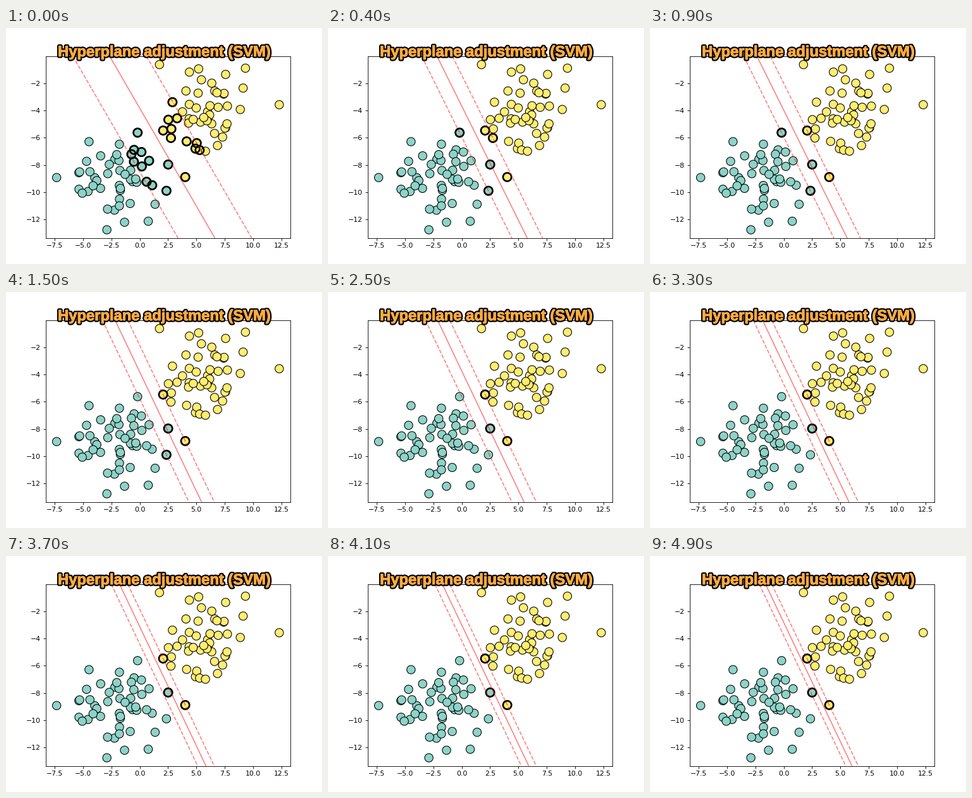
A matplotlib script that plays this animation: 500 px wide and 375 px high, repeating every 5000 ms.

```python
import matplotlib.patheffects as pe
import matplotlib.pyplot as plt
import numpy as np
from matplotlib.animation import FuncAnimation

SEED, COUNT, SPREAD = 40, 100, 1.9
PENALTIES = 0.01 + 0.05 * np.arange(50)
DOT_AREA = 150


def make_blobs():
    """Two shuffled Gaussian clusters, labelled -1 and +1."""
    rng = np.random.RandomState(SEED)
    centers = rng.uniform(-10, 10, (2, 2))
    half = COUNT // 2
    points = np.vstack([rng.normal(c, SPREAD, (half, 2)) for c in centers])
    labels = np.repeat([-1.0, 1.0], half)
    order = np.arange(COUNT)
    rng.shuffle(order)
    return points[order], labels[order]


def fit_svm(points, labels, penalty, tol=1e-3, max_steps=20000):
    """Soft-margin linear SVM by sequential minimal optimisation."""
    kernel = points @ points.T
    diag = np.diag(kernel)
    alpha = np.zeros(len(labels))
    grad = -np.ones(len(labels))
    eps = 1e-10
    for _ in range(max_steps):
        score = -labels * grad
        below, above = alpha < penalty - eps, alpha > eps
        up = np.where(labels > 0, below, above)
        low = np.where(labels > 0, above, below)
        i = np.argmax(np.where(up, score, -np.inf))
        floor = np.min(score[low])
        if score[i] - floor < tol:
            break
        gap = score[i] - score
        curve = np.maximum(kernel[i, i] + diag - 2 * kernel[i], 1e-12)
        j = np.argmax(np.where(low & (gap > 0), gap**2 / curve, -np.inf))
        room_i = penalty - alpha[i] if labels[i] > 0 else alpha[i]
        room_j = alpha[j] if labels[j] > 0 else penalty - alpha[j]
        step = min(gap[j] / curve[j], room_i, room_j)
        alpha[i] += labels[i] * step
        alpha[j] -= labels[j] * step
        grad += labels * (kernel[i] - kernel[j]) * step
    weights = (alpha * labels) @ points
    return weights, (score[i] + floor) / 2, alpha > eps


points, labels = make_blobs()
fits = [fit_svm(points, labels, c) for c in PENALTIES]

low, high = points.min(axis=0), points.max(axis=0)
pad = 0.05 * (high - low)
(x0, y0), (x1, y1) = low - pad, high + pad
grid_x, grid_y = np.meshgrid(np.linspace(x0, x1, 30), np.linspace(y0, y1, 30))

fig, ax = plt.subplots(figsize=(6.4, 4.8), dpi=78.125)
fig.text(0.501, 1 - 45 / 375, "Hyperplane adjustment (SVM)", ha="center",
         va="baseline", family="Liberation Sans", weight="bold", size=21.9,
         color="#ffab40",
         path_effects=[pe.withStroke(linewidth=5, foreground="black"),
                       pe.withStroke(linewidth=0.9, foreground="#ffab40")])


def draw(i):
    weights, bias, support = fits[i]
    ax.clear()
    ax.scatter(*points.T, c=labels, cmap="Set3", s=DOT_AREA,
               edgecolors="black", linewidths=1)
    ax.contour(grid_x, grid_y, weights[0] * grid_x + weights[1] * grid_y + bias,
               levels=[-1, 0, 1], colors="red", alpha=0.5,
               linestyles=["--", "-", "--"])
    ax.scatter(*points[support].T, s=DOT_AREA, facecolors="none",
               edgecolors="black", linewidths=2.5)
    ax.set(xlim=(x0, x1), ylim=(y0, y1))


anim = FuncAnimation(fig, draw, frames=len(fits), init_func=lambda: None,
                     interval=100, repeat=True, repeat_delay=0)
plt.show()
```
